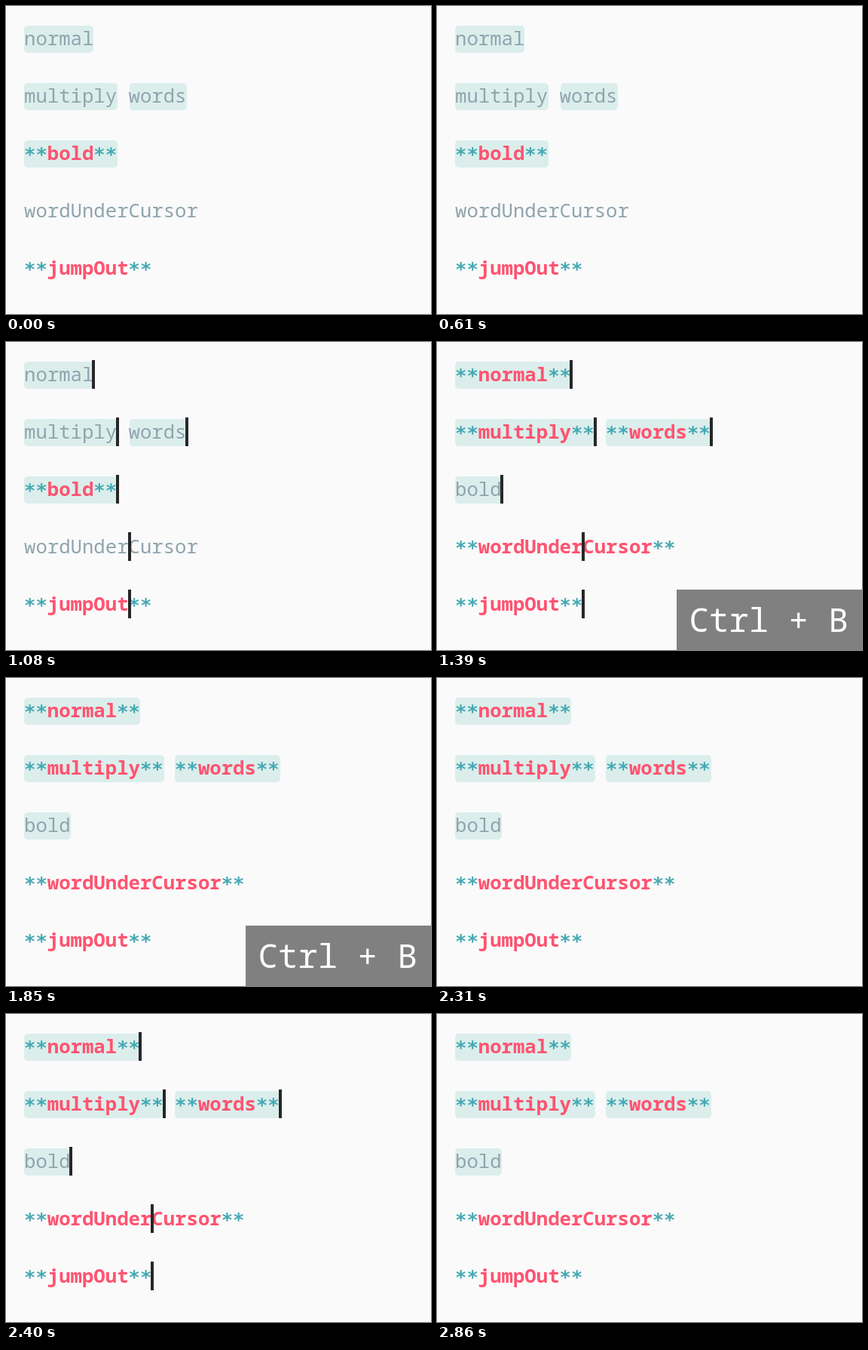
Recreate the animation shown at these times as an HTML page. Size 564 by 408 pixels, loop 3180 ms.

```html
<!DOCTYPE html>
<html lang="en">
<head>
<meta charset="utf-8">
<title>Toggle bold</title>
<style>
  html, body { margin: 0; width: 100%; height: 100%; overflow: hidden; background: #fafafa; }
  svg { display: block; font: 25.66px "Noto Sans Mono", "DejaVu Sans Mono", monospace; }
  .plain { fill: #90a4ae; }
  .bold { fill: #ff5370; font-weight: 600; }
  .mark { fill: #45a9b3; font: 700 25.57px "DejaVu Sans Mono", monospace; }
  .selection { fill: #dbeeec; }
  .cursor { fill: #272727; }
  #keys rect { fill: #808080; }
  #keys text { fill: #fff; font-size: 44px; }
</style>
</head>
<body>
<svg width="564" height="408" viewBox="0 0 564 408">
  <g id="before"></g>
  <g id="after"></g>
  <g id="keys">
    <rect x="318" y="328" width="246" height="80"/>
    <text x="334.5" y="384">Ctrl + B</text>
  </g>
</svg>
<script>
const ADVANCE = 15.394, LEFT = 24, LINE = 76, LOOP = 3180;

// [ ] selects, | places a cursor, ** toggles bold
const BEFORE = ['[normal|]', '[multiply|] [words|]', '[**bold**|]', 'wordUnder|Cursor', '**jumpOut|**'];
const AFTER = ['[**normal**|]', '[**multiply**|] [**words**|]', '[bold|]', '**wordUnder|Cursor**', '**jumpOut**|'];

const $ = id => document.getElementById(id);
const edge = col => 2 * Math.round(12.28 + col * ADVANCE / 2);

function render(lines) {
  let selections = '', texts = '', cursors = '';
  lines.forEach((line, row) => {
    const top = 24 + row * LINE;
    let col = 0, start = 0, bold = false;
    const write = (text, type, drop) => {
      texts += `<text class="${type}" x="${LEFT + col * ADVANCE}" y="${top + 28 + drop}">${text}</text>`;
      col += text.length;
    };
    for (const token of line.match(/\*\*|[\[\]|]|[^*\[\]|]+/g)) {
      if (token === '[') start = col;
      else if (token === ']')
        selections += `<rect class="selection" x="${edge(start)}" y="${top + 2}" width="${edge(col) - edge(start)}" height="36" rx="5"/>`;
      else if (token === '|')
        cursors += `<rect class="cursor" x="${edge(col) - 2}" y="${top}" width="4" height="38"/>`;
      else if (token === '**') {
        write(token, 'mark', 1);
        bold = !bold;
      } else write(token, bold ? 'bold' : 'plain', 0);
    }
  });
  return `${selections}${texts}<g class="cursors">${cursors}</g>`;
}

$('before').innerHTML = render(BEFORE);
$('after').innerHTML = render(AFTER);
const cursors = document.querySelectorAll('.cursors');

const within = (t, from, to) => t >= from && t < to;
const show = (node, on) => node.setAttribute('display', on ? 'inline' : 'none');

function draw(now) {
  const t = now % LOOP;
  const toggled = t >= 1390;
  const lit = within(t, 150, 610) || within(t, 1080, 1850) || within(t, 2400, 2860);
  show($('before'), !toggled);
  show($('after'), toggled);
  show($('keys'), within(t, 1390, 2310));
  cursors.forEach(group => show(group, lit));
}

const began = performance.now();
function tick() {
  draw(performance.now() - began);
  requestAnimationFrame(tick);
}
tick();
</script>
</body>
</html>
```
